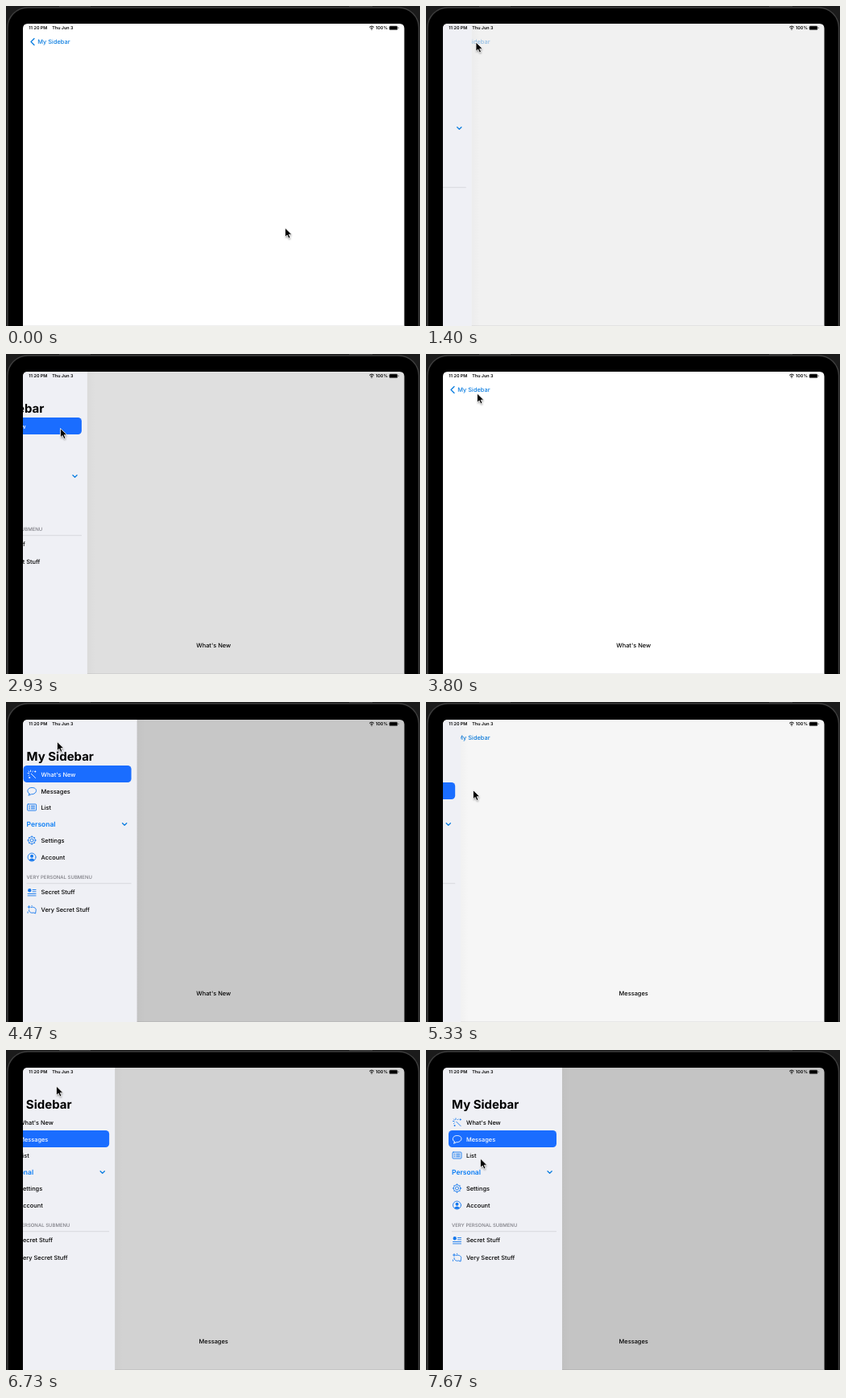
Recreate the animation shown at these times as an HTML page. Size 514x398 px, loop 8000 ms.

```html
<!DOCTYPE html>
<html lang="en">
<head>
<meta charset="utf-8">
<title>Sidebar demo</title>
<style>
html, body { margin: 0; width: 100%; height: 100%; overflow: hidden; background: #111; }
svg { display: block; width: 100%; height: 100%; font: 450 7.4px Inter, "Liberation Sans", sans-serif; text-rendering: geometricPrecision; }
.status { font-size: 5.4px; font-weight: 600; }
.line { fill: none; stroke: #0a7de0; stroke-width: 1.3; stroke-linecap: round; stroke-linejoin: round; }
.row .icon { fill: none; stroke: #1478ee; stroke-width: .9; stroke-linecap: round; stroke-linejoin: round; }
.row .solid { fill: #1478ee; stroke: none; }
.row .pill { fill: #1a6dff; visibility: hidden; }
.on .pill { visibility: visible; }
.on text { fill: #fff; }
.on .icon { stroke: #fff; }
.on .solid { fill: #fff; }
</style>
</head>
<body>
<svg viewBox="0 0 514 398">
  <defs>
    <clipPath id="screen"><path d="M21 398V28q0-6 6-6H488.500q6 0 6 6V398z"/></clipPath>
    <linearGradient id="shade"><stop stop-opacity=".02"/><stop offset="1" stop-opacity="0"/></linearGradient>
    <filter id="soft" x="-50%" y="-50%" width="200%" height="200%"><feGaussianBlur stdDeviation="1.1"/></filter>
  </defs>

  <rect width="514" height="398" fill="#1b1b1b"/>
  <path d="M66 .5h39M426 .5h29" stroke="#3a3a3a" stroke-width="1"/>
  <rect x="2" y="2" width="510.500" height="420" rx="25" fill="#000" stroke="#3d3d3d" stroke-width="1.500"/>

  <g clip-path="url(#screen)">
    <rect x="21" y="22" width="474" height="376" fill="#fff"/>
    <path d="M21 397.700H495" stroke="#ddd" stroke-width=".6"/>
    <g id="back">
      <path class="line" d="M35 40.500l-4 4 4 4"/>
      <text x="39.300" y="47.200" fill="#0a7de0">My Sidebar</text>
    </g>
    <rect id="dim" x="21" y="22" width="474" height="376"/>
    <text id="detail" x="257.700" y="365" text-anchor="middle"></text>
    <g id="sidebar">
      <rect x="169" y="22" width="10" height="376" fill="url(#shade)"/>
      <rect x="21" y="22" width="148" height="376" fill="#eff0f5"/>
      <text x="32" y="72.800" font-size="15" font-weight="700">My Sidebar</text>
      <text x="32" y="154.800" font-size="8.500" font-weight="600" fill="#0a7df5">Personal</text>
      <path class="line" d="M151 150.800l2.600 2.500 2.600-2.500"/>
      <text x="32" y="220.200" font-size="6" fill="#7d7d84">VERY PERSONAL SUBMENU</text>
      <path d="M32 225.700H162" stroke="#d2d3d8" stroke-width=".8"/>
      <g id="rows"></g>
    </g>
    <g class="status">
      <text x="28.300" y="29.300">11:20 PM</text>
      <text x="57.300" y="29.300">Thu Jun 3</text>
      <text x="459" y="29.300">100%</text>
      <g fill="none" stroke="#000" stroke-width="1">
        <path d="M451.200 26.300q2.800-2.500 5.600 0M452.500 27.800q1.500-1.300 3 0"/>
        <circle cx="454" cy="29.100" r=".3"/>
        <rect x="476" y="25" width="10" height="4.600" rx="1.200" fill="#000" stroke="#555" stroke-width=".6"/>
        <path d="M487.500 26.500v1.600" stroke="#777" stroke-width=".8"/>
      </g>
    </g>
  </g>

  <g id="cursor">
    <path d="M.5 2V13l2.500-2.400 1.900 4 2-.9-1.800-3.900h3.500z" opacity=".4" filter="url(#soft)"/>
    <path d="M0 0V11.300l2.600-2.400 1.900 4.100 2-.9-1.800-3.900h3.600z" stroke="#fff" stroke-width=".8"/>
  </g>
</svg>
<script>
const $ = id => document.getElementById(id);

// Icons are drawn around the middle of their row.
const rows = [
  ["What's New", 90, "M-.8-.8L4.500 4.500M-1.500-5v1.600M-5-1.500h1.600M-4-4l.8.8M1.500-4l-.8.8M-4 1.500l.8-.8M3.500-3.500h1.400M4.200-4.200v1.400M-3.500 4h1.200M-2.900 3.400v1.200"],
  ["Messages", 111, "M-3 3.200C-7 1-5.500-4.500 0-4.500S6-1 5 1 1 4-.8 3.700Q-2.500 5.200-4.300 5-2.800 4.300-3 3.200z"],
  ["List", 131, "M-4.500-4h9q1 0 1 1v6q0 1-1 1h-9q-1 0-1-1v-6q0-1 1-1zM-3.500-1.800h1M-3.500 0h1M-3.500 1.800h1M-.8-1.800h4.300M-.8 0h4.300M-.8 1.800h4.300"],
  ["Settings", 172, "M2 0A2 2 0 1 1-2 0 2 2 0 1 1 2 0M4.300 0A4.300 4.300 0 1 1-4.300 0 4.300 4.300 0 1 1 4.300 0M0-5.300v1M0 5.300v-1M-5.300 0h1M5.300 0h-1M-3.700-3.700l.6.6M3.700 3.700l-.6-.6M-3.700 3.700l.6-.6M3.700-3.700l-.6.6"],
  ["Account", 193, "M5 0A5 5 0 1 1-5 0 5 5 0 1 1 5 0", "M2-1.200A2 2 0 1 1-2-1.200 2 2 0 1 1 2-1.200M-3.500 3.400Q0-.5 3.500 3.400 0 6-3.500 3.400z"],
  ["Secret Stuff", 236.5, "M1-3h4M1-.6h4M-5 2h10M-5 4.400h10", "M-.6-2.200A2.200 2.200 0 1 1-5-2.200 2.200 2.200 0 1 1-.6-2.200"],
  ["Very Secret Stuff", 258.5, "M-1-3C3-4.500 6-1.500 5 1.200L4.500 4.500 2 3.500C-1 4.500-4 2.500-3.500 0M-3.500-5v3M-5-3.500h3M-5 2.500v1.400M0-5.200v.6"]
];

$("rows").innerHTML = rows.map(([label, y, icon, solid = ""]) => `
  <g class="row">
    <rect class="pill" x="28" y="${y - 11}" width="134" height="21" rx="4.500"/>
    <g transform="translate(38.500 ${y})"><path class="icon" d="${icon}"/><path class="solid" d="${solid}"/></g>
    <text x="50" y="${y + 2.700}">${label}</text>
  </g>`).join("");
const rowNodes = [...$("rows").children];

// Cursor moves: start, end, target x, target y
const moves = [
  [70, 900, 62, 45],
  [2130, 2510, 67.5, 92.5],
  [3230, 3720, 63.5, 49],
  [4450, 4920, 58.5, 109.5],
  [5480, 6080, 62.5, 45],
  [6960, 7640, 67.5, 135]
];
// Sidebar slides: start, open state
const slides = [[1334, 1], [2820, 0], [4120, 1], [5090, 0], [6530, 1]];
// Selected row by time
const picks = [[0, -1], [2800, 0], [5070, 1]];

const clamp = v => Math.min(1, Math.max(0, v));
const ease = u => u * u * (3 - 2 * u);
const spring = ms => 1 - (1 + .014 * ms) * Math.exp(-.014 * ms);

function cursorAt(t) {
  let x = 346.5, y = 276;
  for (const [start, end, tx, ty] of moves) {
    const u = ease(clamp((t - start) / (end - start)));
    x += (tx - x) * u;
    y += (ty - y) * u;
  }
  return [x, y];
}

function draw(t) {
  const slide = slides.findLast(s => t >= s[0]) || [-2000, 0];
  const p = spring(t - slide[0]), open = slide[1] ? p : 1 - p;
  const picked = picks.findLast(s => t >= s[0])[1];

  $("sidebar").setAttribute("transform", `translate(${-148 * (1 - open)} 0)`);
  $("sidebar").style.visibility = open < .002 ? "hidden" : "visible";
  $("dim").setAttribute("fill-opacity", .231 * open);
  $("back").setAttribute("opacity", slide[1] ? clamp(1 - open * 2.5) : 1);
  $("detail").textContent = picked < 0 ? "" : rows[picked][0];
  rowNodes.forEach((node, i) => node.classList.toggle("on", i === picked));
  $("cursor").setAttribute("transform", `translate(${cursorAt(t)})`);
}

const begin = performance.now();
function tick() {
  draw((performance.now() - begin) % 8000);
  requestAnimationFrame(tick);
}
tick();
</script>
</body>
</html>
```
